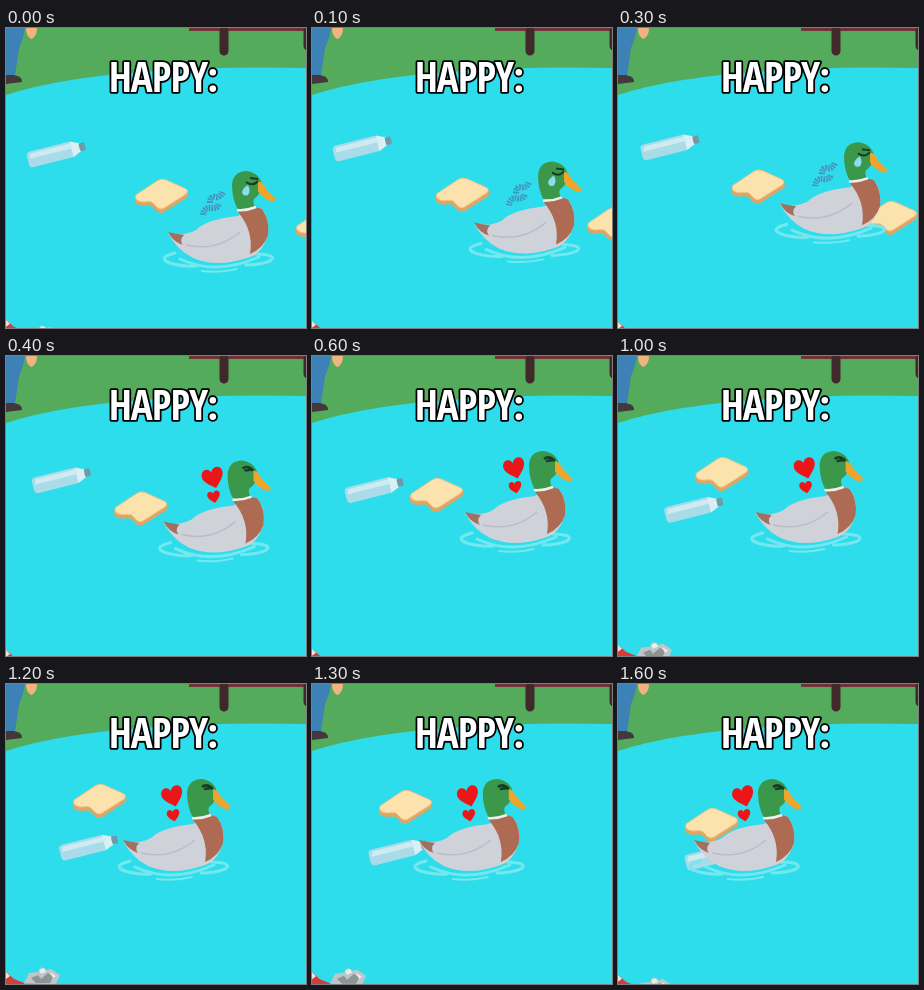
An HTML page for the animation above (1.7 s loop, 300 px wide and 300 px high).

```html
<!DOCTYPE html>
<html lang="en">
<head>
<meta charset="utf-8">
<style>
  html, body { margin: 0; width: 100%; height: 100%; overflow: hidden; }
  svg { display: block; width: 300px; height: 300px; background: #2eddeb; }
  text {
    font: 700 41px "Open Sans Condensed", "Roboto Condensed", "Liberation Sans Narrow", "Open Sans", sans-serif;
    font-stretch: 75%;
    letter-spacing: -1px;
    fill: #fff;
    stroke: #000;
    stroke-width: 3.5px;
    stroke-linejoin: round;
    paint-order: stroke;
  }
</style>
</head>
<body>
<svg viewBox="0 0 300 300">
  <defs>
    <path id="face" d="M-25-1L-4-15Q0-18 5-16L25-7Q28-5 25-2L3 12Q0 14-3 12L-9 6Q-13 5-18 6Q-27 5-25-1Z"/>
    <g id="slice">
      <use href="#face" y="3" fill="#dfa564" stroke="#dfa564" stroke-width="2"/>
      <use href="#face" fill="#fce2ad" stroke="#efc588"/>
    </g>
    <path id="heart" fill="#ec1518" d="M1 11C-5 6-12 1-10-5C-8-11-1-10 0-5C2-11 10-11 11-5C12 1 6 6 1 11Z"/>
  </defs>

  <path fill="#55ab5c" d="M0 0H300V40Q215 38 150 43Q55 49 0 67Z"/>
  <path fill="#6f3338" d="M183 0H300V3H183Z"/>
  <path fill="none" stroke="#40282b" stroke-width="9" stroke-linecap="round" d="M218 3V23M302 3V18"/>
  <path fill="#3c82b7" d="M0 0H19Q17 12 13 20L9 48H0Z"/>
  <path fill="#f0b480" d="M20 0H31Q31 9 25 11Q20 8 20 0"/>
  <path fill="#43383b" d="M0 47H8Q17 49 16 54L0 56Z"/>

  <g id="bottle">
    <rect x="-30" y="-8" width="47" height="16" rx="4" fill="#a9dbe8"/>
    <path fill="#cdebf1" d="M-26-6H15V-1H-28Z"/>
    <path fill="#d8eff4" d="M15-8L24-4V4L15 8Z"/>
    <rect x="23" y="-4" width="6" height="8" rx="1.5" fill="#6f9aa9"/>
  </g>
  <use id="snack" href="#slice"/>
  <use id="bread" href="#slice"/>

  <g id="duck">
    <g fill="none" stroke="#74e8ee" stroke-width="3" stroke-linecap="round">
      <path d="M169 225Q150 230 164 235Q178 239 190 238M250 226Q273 227 264 233Q254 237 240 237M174 231Q210 248 253 229"/>
      <path stroke-width="2" d="M196 243Q215 245 231 241"/>
    </g>
    <path fill="#d0d2da" d="M162 205Q177 209 190 202Q201 191 232 188Q246 178 256 181Q264 191 262 206Q257 226 241 230Q211 240 187 230Q171 222 162 205Z"/>
    <path fill="#a2705f" d="M162 204Q170 206 178 207Q173 212 177 217Q167 214 162 204Z"/>
    <path fill="none" stroke="#bcbcc8" stroke-width="1.5" d="M180 217Q210 224 234 204"/>
    <path fill="#ad6b53" d="M232 184Q247 177 256 181Q264 192 262 207Q258 220 244 226Q248 203 232 184Z"/>
    <path fill="#3b984b" d="M226 157Q227 143 241 143Q254 145 256 157Q255 166 248 171Q246 175 250 180L232 182Q226 171 226 157Z"/>
    <path fill="none" stroke="#eef0ee" stroke-width="2.5" d="M231 182Q240 183 250 179"/>
    <path fill="#eda52c" d="M252 153Q257 154 260 161L269 170Q270 174 264 173Q254 168 252 163Z"/>
    <g id="sad">
      <path fill="none" stroke="#173d28" stroke-width="2" d="M240 154Q247 159 252 153M244 150L252 151"/>
      <path fill="#8adcf1" d="M242 157Q245 163 242 167Q237 169 236 164Q237 160 242 157"/>
      <path fill="none" stroke="#4593bb" stroke-width="6" stroke-dasharray="1.5 1" d="M197 187Q198 179 205 180Q212 181 213 175M204 175Q204 168 209 169Q215 170 217 163"/>
    </g>
    <g id="happy">
      <path fill="none" stroke="#173d28" stroke-width="2.5" d="M241 151Q246 147 252 153M243 153L251 152"/>
      <use href="#heart" transform="translate(211 160) rotate(-14)"/>
      <use href="#heart" transform="translate(212 179) rotate(-8) scale(.59)"/>
    </g>
  </g>

  <g id="cans">
    <path fill="#c0c5c7" d="M-18 17L-13 7L-4 6L-1 1L5 4L9 3L18 9L14 18Z"/>
    <path fill="#8d9496" d="M-11 12L-4 9L-1 13L6 7L11 11L8 17L-6 17Z"/>
    <path fill="#e8ecec" d="M-3 4L2 2L4 6L-1 8ZM8 6L14 10L11 12Z"/>
  </g>
  <g id="wrapper">
    <path fill="#d63c3c" d="M-10 0L0-7L8 0L18 4V18H-10Z"/>
    <path fill="#eee5df" d="M-8-2L0-7L4-3L-4 3Z"/>
  </g>
  <text x="157" y="63.5" text-anchor="middle">HAPPY:</text>
</svg>
<script>
const LOOP = 1700, STEP = 100, FED = 400;
const $ = id => document.getElementById(id);
const ramp = (t, from, to) => Math.min(1, Math.max(0, (t - from) / (to - from)));
const smooth = k => k * k * (3 - 2 * k);

function place(id, x, y, angle = 0) {
  $(id).setAttribute("transform", `translate(${x} ${y}) rotate(${angle})`);
}
function show(id, on) {
  $(id).setAttribute("visibility", on ? "visible" : "hidden");
}

function draw(now) {
  const t = Math.floor(now % LOOP / STEP) * STEP;
  const bob = Math.cos(2 * Math.PI * (t - 1200) / LOOP);

  // The duck rises to the first slice, then drifts back to the second
  place("duck", -9 * ramp(t, 300, 500) - 77 * ramp(t, 850, 1600), -48 * ramp(t, 0, 500));
  place("snack", 316 - 0.147 * t, 199 - 0.03 * t);
  place("bread", 155 - 62 * ramp(t, 0, 1200),
    168 - 51 * smooth(ramp(t, 0, 1100)) + 24 * ramp(t, 1200, 1600));
  place("bottle", 51 + 46 * ramp(t, 250, 1600),
    125 - 12 * ramp(t, 0, 200) + 59 * ramp(t, 200, 1400), -14);
  place("cans", 36, 293 - 11 * bob);
  place("wrapper", 0, 298 - 3 * bob);

  show("sad", t < FED);
  show("snack", t < FED);
  show("happy", t >= FED);
  requestAnimationFrame(draw);
}
requestAnimationFrame(draw);
</script>
</body>
</html>
```
